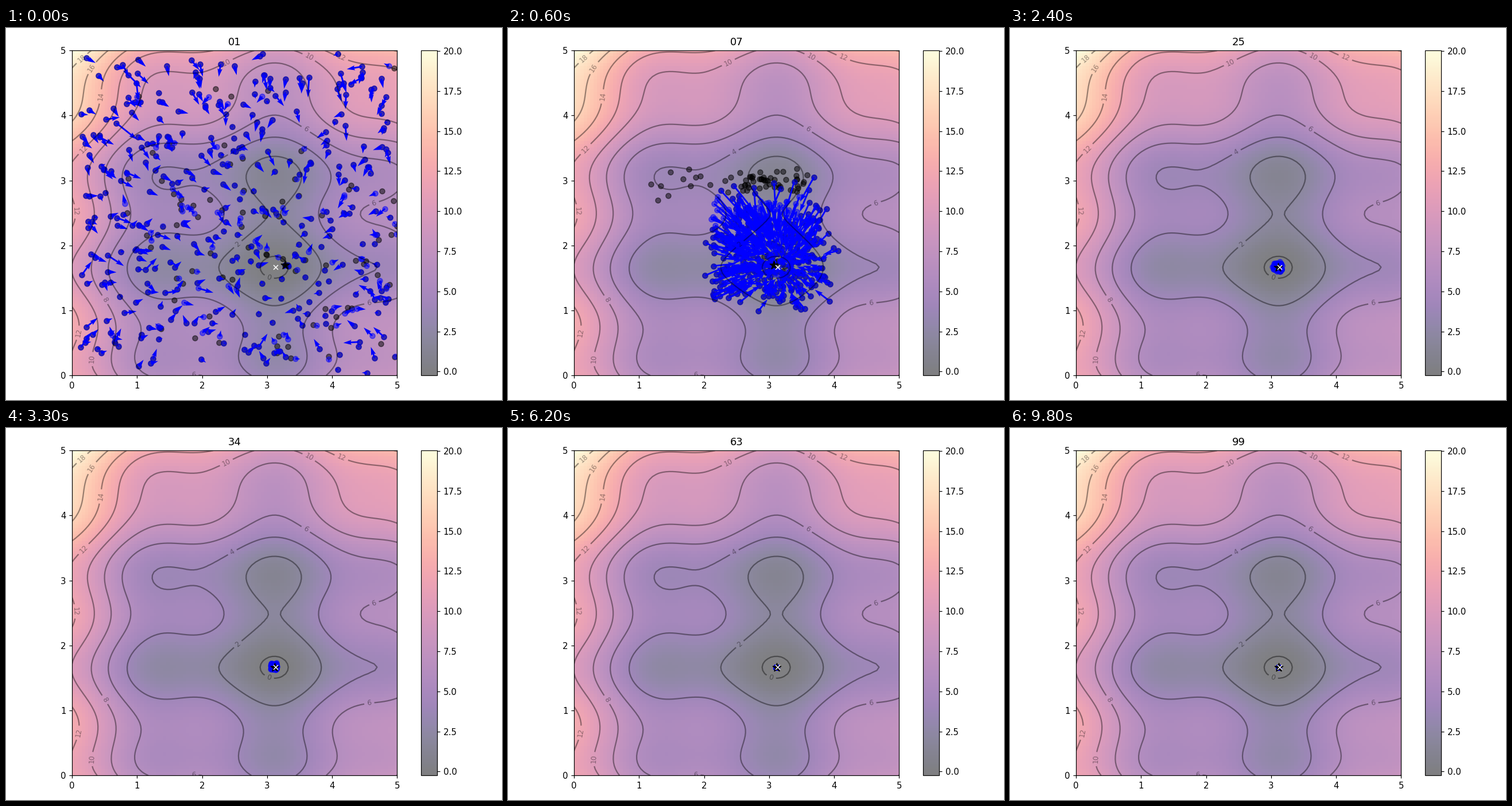
A matplotlib script for the animation above (9900 ms loop, 864 by 648 pixels).

```python
import numpy as np
import matplotlib.pyplot as plt
from matplotlib.animation import FuncAnimation

W, H, DPI = 864, 648, 108
STEPS = 99
N = 420
INERTIA, OWN_PULL, SWARM_PULL = 0.8, 0.015, 0.045
SIDE = 566.1
TOP = 39.2


def cost(x, y):
    bowl = (x - 2.915) ** 2 + (y - 1.93) ** 2
    waves = np.sin(3 * x + 1.515) + np.sin(4 * y - 1.806)
    dip = 2 * np.exp(-1.2 * np.hypot(x, y))
    return bowl + waves - dip + 1.65


def swarm_states():
    """Particle swarm history: position, velocity, own best, swarm best."""
    rng = np.random.RandomState(100)
    pos = rng.rand(2, N) * 5
    vel = rng.randn(2, N) * 0.08
    lead = np.array([3.28, 1.70])
    pos[0, cost(*pos) < cost(*lead)] += 1.5
    pos[:, 0], vel[:, 0] = lead, 0
    best, best_cost = pos.copy(), cost(*pos)
    top = best[:, best_cost.argmin()]
    states = []
    for _ in range(STEPS):
        vel = (INERTIA * vel + OWN_PULL * (best - pos)
               + SWARM_PULL * (top[:, None] - pos))
        pos = pos + vel
        now = cost(*pos)
        better = now < best_cost
        best = np.where(better, pos, best)
        best_cost = np.minimum(now, best_cost)
        top = best[:, best_cost.argmin()]
        states.append((pos, vel, best, top))
    return states


def add_panel(left, width):
    return fig.add_axes([left / W, 1 - (TOP + SIDE) / H, width / W, SIDE / H])


states = swarm_states()
pos, vel, best, top = states[0]

axis = np.linspace(0, 5, 100)
gx, gy = np.meshgrid(axis, axis)
gz = cost(gx, gy)
low = gz.argmin()

fig = plt.figure(figsize=(W / DPI, H / DPI), dpi=DPI)
ax = add_panel(115.1, SIDE)
cax = add_panel(722.7, SIDE / 20)

img = ax.imshow(gz, extent=[0, 5, 0, 5], origin="lower", cmap="magma",
                alpha=0.5, vmin=-0.25, vmax=20.03)
fig.colorbar(img, cax=cax)
ax.plot(gx.flat[low], gy.flat[low], marker="x", markersize=5, color="white")
lines = ax.contour(gx, gy, gz, levels=range(0, 20, 2), colors="black", alpha=0.4)
ax.clabel(lines, inline=True, fontsize=8, fmt="%.0f")

best_dots = ax.scatter(*best, color="black", alpha=0.5)
dots = ax.scatter(*pos, color="blue", alpha=0.5)
arrows = ax.quiver(*pos, *vel, color="blue", width=0.005,
                   angles="xy", scale_units="xy", scale=1)
star = ax.scatter(*top, marker="*", s=100, color="black")
title = ax.set_title("01")
ax.set(xlim=(0, 5), ylim=(0, 5), xticks=range(6), yticks=range(6))


def update(step):
    pos, vel, best, top = states[step - 1]
    title.set_text(f"{step:02d}")
    best_dots.set_offsets(best.T)
    dots.set_offsets(pos.T)
    arrows.set_offsets(pos.T)
    arrows.set_UVC(*vel)
    star.set_offsets([top])
    return title, best_dots, dots, arrows, star


anim = FuncAnimation(fig, update, frames=range(1, STEPS + 1), interval=100,
                     repeat=True, repeat_delay=0)
plt.show()
```
